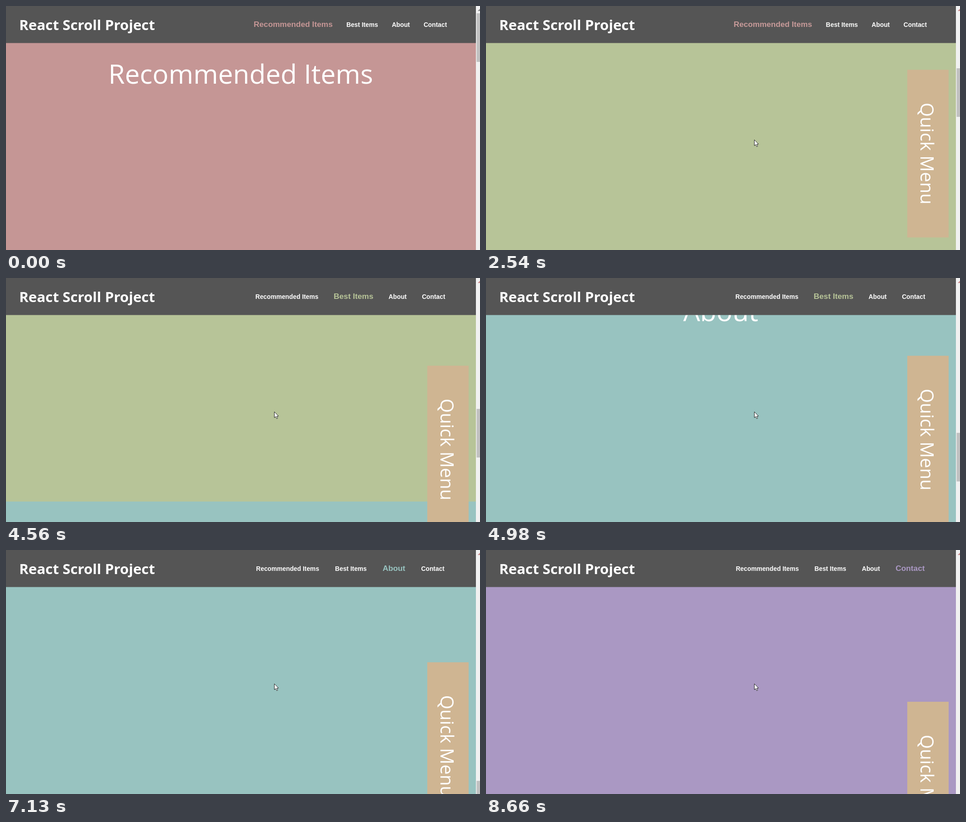
An HTML page for the animation above (9.32 s loop, 1043x537 px).

```html
<!DOCTYPE html>
<html lang="en">
<head>
<meta charset="utf-8">
<title>React Scroll Project</title>
<style>
  html, body { margin: 0; width: 100%; height: 100%; overflow: hidden; background: #c59695; }
  svg { display: block; width: 1043px; height: 537px; }
  text { fill: #fff; font-family: "Open Sans", "Noto Sans", sans-serif; white-space: pre; }
  .title { font-size: 58.6px; text-anchor: middle; }
  .brand { font-size: 31.2px; font-weight: 700; }
  .quick { font-size: 40px; }
  .nav text { font-family: "Liberation Sans", Arial, sans-serif; font-weight: 700; }
</style>
</head>
<body>
<svg viewBox="0 0 1043 537">
  <g id="page"></g>
  <g id="menu">
    <rect x="927" width="91" height="369" fill="#cfb592"/>
    <text class="quick" transform="translate(956 72.5) rotate(90)">Quick Menu</text>
  </g>
  <rect width="1034" height="81.5" fill="#555"/>
  <text class="brand" x="29" y="52.5">React Scroll Project</text>
  <g id="nav" class="nav"></g>
  <rect x="1034" width="9" height="537" fill="#f1f1f1"/>
  <path id="arrow" d="M1038 11L1043 6V11Z"/>
  <rect id="thumb" x="1035.5" width="8" height="107" fill="#c1c1c1"/>
  <path id="cursor" d="M590.5 294.5V307.5L593.5 304.8L595.6 309.6L597.8 308.6L595.8 304H599.8Z"
        fill="#fff" stroke="#222" stroke-width="1"/>
</svg>
<script>
const LOOP = 9320;
const SCROLL_PER_THUMB_PX = 9.24;
const SMALL = 13.8, LARGE = 17.3;

const sections = [
  { name: "Recommended Items", top: 81, color: [197, 150, 149], from: -1000 },
  { name: "Best Items", top: 1070, color: [183, 196, 152], from: 2490 },
  { name: "About", top: 3006, color: [152, 195, 192], from: 5030 },
  { name: "Contact", top: 5973, color: [170, 152, 195], from: 8220 }
];

// Pairs of time and value
const scrollKeys = [
  [0, 0], [810, 0], [1270, 300], [1600, 300], [1800, 647], [2200, 1030], [2540, 1118],
  [2750, 1180], [3400, 1180], [4560, 2513], [5300, 3190], [5890, 3190], [5950, 3197],
  [6800, 4460], [7030, 4460], [7130, 4546], [7650, 5300], [7900, 5300], [8500, 6020], [LOOP, 6020]
];
const menuKeys = [
  [0, 634], [810, 634], [1270, 334], [1600, 334], [1800, 21], [1990, -30], [2540, 140],
  [3020, 334], [3400, 334], [3800, 60], [4560, 193], [4850, 150], [5470, 334], [5890, 334],
  [5950, 328], [6300, 50], [6870, 240], [6940, 334], [7030, 334], [7130, 248], [7330, 60],
  [7770, 334], [7910, 334], [8170, 90], [8660, 334], [LOOP, 334]
];

const $ = id => document.getElementById(id);

function add(parent, tag, attrs, content = "") {
  const node = document.createElementNS("http://www.w3.org/2000/svg", tag);
  for (const key in attrs) node.setAttribute(key, attrs[key]);
  node.textContent = content;
  return parent.appendChild(node);
}

// Monotone cubic interpolation: smooth, without overshoot
function curve(keys, t) {
  const slope = i => i < 0 || i > keys.length - 2 ? 0
    : (keys[i + 1][1] - keys[i][1]) / (keys[i + 1][0] - keys[i][0]);
  const tangent = i => {
    const a = slope(i - 1), b = slope(i);
    return a * b > 0 ? 2 * a * b / (a + b) : 0;
  };
  let i = 0;
  while (i < keys.length - 2 && t >= keys[i + 1][0]) i++;
  const [t0, v0] = keys[i], [t1, v1] = keys[i + 1];
  const span = t1 - t0, u = (t - t0) / span, w = 1 - u;
  return v0 * (1 + 2 * u) * w * w + tangent(i) * span * u * w * w
    + v1 * u * u * (3 - 2 * u) - tangent(i + 1) * span * u * u * w;
}

function fade(t, start, length = 420) {
  const u = Math.min(1, Math.max(0, (t - start) / length));
  return u * u * (3 - 2 * u);
}

for (const section of sections) {
  const { name, top, color } = section;
  add($("page"), "rect", { y: top, width: 1034, height: 4000, fill: `rgb(${color})` });
  add($("page"), "text", { class: "title", x: 516.5, y: top + 90 }, name);
  section.link = add($("nav"), "text", { y: 46 }, name);
}

function drawNav(t) {
  sections.forEach(({ link, color, from }, i) => {
    const next = sections[i + 1];
    const active = fade(t, from) - (next ? fade(t, next.from) : 0);
    link.style.fontSize = SMALL + (LARGE - SMALL) * active + "px";
    link.style.fill = `rgb(${color.map(c => Math.round(255 + (c - 255) * active))})`;
  });
  const widths = sections.map(s => s.link.getComputedTextLength());
  const total = widths.reduce((a, b) => a + b);
  const gap = 34.9 - (total - 310) * 0.191;
  let x = 757.6 - total / 2 - gap * 1.5;
  sections.forEach(({ link }, i) => {
    link.setAttribute("x", x);
    x += widths[i] + gap;
  });
}

function draw(t) {
  const scroll = curve(scrollKeys, t);
  $("page").setAttribute("transform", `translate(0 ${-scroll})`);
  $("menu").setAttribute("transform", `translate(0 ${curve(menuKeys, t)})`);
  $("thumb").setAttribute("y", 16 + scroll / SCROLL_PER_THUMB_PX);
  $("arrow").setAttribute("fill", scroll > 0 ? "#c98b8b" : "#8a8a8a");
  $("cursor").setAttribute("visibility", t < 70 ? "hidden" : "visible");
  drawNav(t);
}

const start = performance.now();
function tick() {
  draw((performance.now() - start) % LOOP);
  requestAnimationFrame(tick);
}
tick();
</script>
</body>
</html>
```
